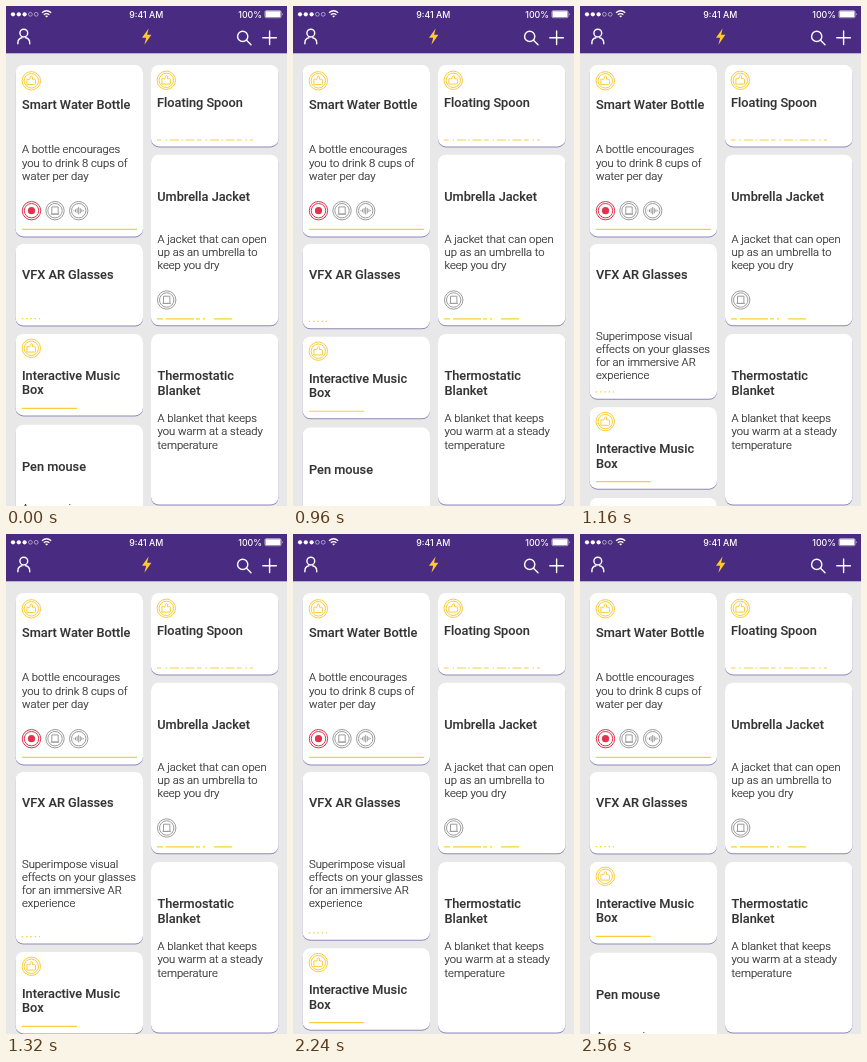
Recreate the animation shown at these times as an HTML page. Size 281 by 500 pixels, loop 3240 ms.

```html
<!DOCTYPE html>
<html lang="en">
<head>
<meta charset="utf-8">
<title>Idea cards</title>
<style>
  html, body { margin: 0; width: 100%; height: 100%; overflow: hidden; background: #e8e8e8; }
  svg { display: block; width: 100vw; height: 100vh; }
  text { font-family: Roboto, sans-serif; white-space: pre; }
  .title { font-size: 12.74px; font-weight: 500; fill: #333; stroke: #333; stroke-width: .12; }
  .note { font-size: 11.24px; font-weight: 300; fill: #2a2a2a; stroke: #2a2a2a; stroke-width: .18; }
  .status { font: 500 8.8px Inter, sans-serif; fill: #fff; }
  .card { fill: #fff; width: 127.5px; rx: 8px; filter: drop-shadow(0 1.2px .6px #9186b8); }
  .bar { stroke: #f9cf3f; stroke-width: 1.2; fill: none; }
  .icon { fill: none; stroke-width: 1; stroke-linejoin: round; }
  .gold { stroke: #fbcd38; }
  .gray { stroke: #9c9c9c; }
  .red { stroke: #e3324f; }
  .nav { fill: none; stroke: #fff; stroke-width: 1.4; stroke-linecap: round; }

  .grow, .push, .tap { animation: 3240ms linear infinite; }
  .grow { height: 81.5px; animation-name: grow; }
  .push { animation-name: push; }
  .tap { fill: #b8b8b8; opacity: 0; animation-name: tap; }

  /* Opens from 920 to 1320 ms, closes along the mirrored curve from 2160 to 2560 ms */
  @keyframes grow {
    0%, 79.0123%, 100% { height: 81.5px; }
    28.3951% { height: 81.5px; animation-timing-function: cubic-bezier(.35, 0, .38, 1); }
    40.7407% { height: 171.5px; }
    66.6667% { height: 171.5px; animation-timing-function: cubic-bezier(.62, 0, .65, 1); }
  }
  @keyframes push {
    0%, 79.0123%, 100% { transform: translateY(0); }
    28.3951% { transform: translateY(0); animation-timing-function: cubic-bezier(.35, 0, .38, 1); }
    40.7407% { transform: translateY(90px); }
    66.6667% { transform: translateY(90px); animation-timing-function: cubic-bezier(.62, 0, .65, 1); }
  }
  @keyframes tap {
    0%, 22.215%, 28.4%, 60.485%, 66.7%, 100% { opacity: 0; }
    22.22%, 60.49% { opacity: .6; }
  }
</style>
</head>
<body>
<svg viewBox="0 0 281 500" preserveAspectRatio="none">
  <defs>
    <g id="rings"><circle r="9.2"/><circle r="7.2"/></g>
    <g id="thumb">
      <use href="#rings"/>
      <path d="M-4.4-1.6v5.4h7.6q1 0 1-1v-3.4q0-1-1-1h-2v-2q0-1-1-1-.9 0-1.1.9l-.6 2.1z"/>
    </g>
    <g id="chip">
      <use href="#rings"/>
      <path d="M-3.2-3.8h6.4v7.2h-6.4zM-4.2 3.4h8.4"/>
    </g>
    <g id="wave">
      <use href="#rings"/>
      <path d="M-4.8-.5v1M-3.2-1.4v2.8M-1.6-2.6v5.2M0-3.8v7.6M1.6-2.6v5.2M3.2-1.4v2.8M4.8-.5v1"/>
    </g>
    <clipPath id="fit"><rect class="grow" x="9.5" y="238" width="127.5" rx="8"/></clipPath>
  </defs>

  <rect width="281" height="500" fill="#e8e8e8"/>

  <!-- Left column -->
  <rect class="card" x="9.5" y="59" height="171.4"/>
  <use class="icon gold" href="#thumb" x="25.3" y="74.8"/>
  <text class="title" x="16" y="103">Smart Water Bottle</text>
  <text class="note">
    <tspan x="16" y="147.4">A bottle encourages</tspan><tspan x="16" dy="13.2">you to drink 8 cups of</tspan><tspan x="16" dy="13.2">water per day</tspan>
  </text>
  <use class="icon red" href="#rings" x="25.5" y="204.7"/>
  <circle cx="25.5" cy="204.7" r="3.6" fill="#e3324f"/>
  <use class="icon gray" href="#chip" x="49" y="204.7"/>
  <use class="icon gray" href="#wave" x="72.7" y="204.7"/>
  <path class="bar" d="M16 223.4h115"/>

  <rect class="card grow" x="9.5" y="238"/>
  <text class="title" x="16" y="272.7">VFX AR Glasses</text>
  <g clip-path="url(#fit)">
    <text class="note">
      <tspan x="16" y="333.6">Superimpose visual</tspan><tspan x="16" dy="13.2">effects on your glasses</tspan><tspan x="16" dy="13.2">for an immersive AR</tspan><tspan x="16" dy="13.2">experience</tspan>
    </text>
  </g>

  <g class="push">
    <path class="bar" d="M15.7 312.6h18.3" stroke-dasharray="1.5 2.8"/>
    <rect class="card" x="9.5" y="328" height="81.4"/>
    <use class="icon gold" href="#thumb" x="25.3" y="342.3"/>
    <text class="title">
      <tspan x="16" y="374">Interactive Music</tspan><tspan x="16" dy="14.4">Box</tspan>
    </text>
    <path class="bar" d="M16 402.4h55"/>
    <rect class="card" x="9.5" y="418.7" height="171.4"/>
    <text class="title" x="16" y="465">Pen mouse</text>
    <text class="note" x="16" y="506">A mouse in a pen</text>
  </g>

  <!-- Right column -->
  <rect class="card" x="145" y="59" height="81.4"/>
  <use class="icon gold" href="#thumb" x="160.3" y="74.3"/>
  <text class="title" x="151" y="101.2">Floating Spoon</text>
  <path class="bar" d="M151 134h96" stroke-dasharray="4.5 4 1.5 3 9 2.5 1.5 2.5 9 2.5"/>

  <rect class="card" x="145" y="148.7" height="170.6"/>
  <text class="title" x="151.3" y="194.5">Umbrella Jacket</text>
  <text class="note">
    <tspan x="151.5" y="236.7">A jacket that can open</tspan><tspan x="151.5" dy="13.2">up as an umbrella to</tspan><tspan x="151.5" dy="13.2">keep you dry</tspan>
  </text>
  <use class="icon gray" href="#chip" x="160.7" y="294"/>
  <path class="bar" d="M151 312.8h6m3 0h28m2 0h4m3 0h2m9 0h18"/>

  <rect class="card" x="145" y="328" height="170.6"/>
  <text class="title">
    <tspan x="151.5" y="374.4">Thermostatic</tspan><tspan x="151.5" dy="14.4">Blanket</tspan>
  </text>
  <text class="note">
    <tspan x="151.5" y="416.2">A blanket that keeps</tspan><tspan x="151.5" dy="13.2">you warm at a steady</tspan><tspan x="151.5" dy="13.2">temperature</tspan>
  </text>

  <!-- Header -->
  <rect width="281" height="47.3" fill="#4a2b82"/>
  <g fill="#fff">
    <circle cx="7" cy="8.3" r="2.1"/><circle cx="12.8" cy="8.3" r="2.1"/><circle cx="18.6" cy="8.3" r="2.1"/>
  </g>
  <g fill="none" stroke="#fff" stroke-width=".5">
    <circle cx="24.4" cy="8.3" r="1.9"/><circle cx="30.2" cy="8.3" r="1.9"/>
  </g>
  <path d="M36 6.8q4.6-4 9.2 0M37.8 8.7q2.8-2.3 5.6 0" fill="none" stroke="#fff" stroke-width="1.3"/>
  <path d="M39.1 10q1.5-1.1 3 0l-1.5 1.6z" fill="#fff"/>
  <text class="status" x="140.3" y="11.6" text-anchor="middle">9:41 AM</text>
  <text class="status" x="256" y="11.6" text-anchor="end">100%</text>
  <rect x="259" y="4.7" width="16" height="7" rx="1.3" fill="none" stroke="#fff" stroke-width=".6"/>
  <path d="M259.6 5.3h14.8v5.8h-14.8zM276 7q1.2 1.2 0 2.4z" fill="#fff"/>

  <g class="nav">
    <circle cx="17.8" cy="27.1" r="3.9"/>
    <path d="M11.9 37.8v-1q0-4 4-5M23.7 37.8v-1q0-4-4-5"/>
    <circle cx="236.7" cy="30.4" r="5.1"/>
    <path d="M240.5 34.2l4.5 4.5M256.8 31.7h13.6M263.6 24.9v13.6"/>
  </g>
  <path d="M142.6 22.6l-6.6 9.2h4.2l-1.8 7 7-10h-4.3z" fill="#fec82f"/>

  <circle class="tap" cx="73.3" cy="275.3" r="15.2"/>
</svg>
</body>
</html>
```
